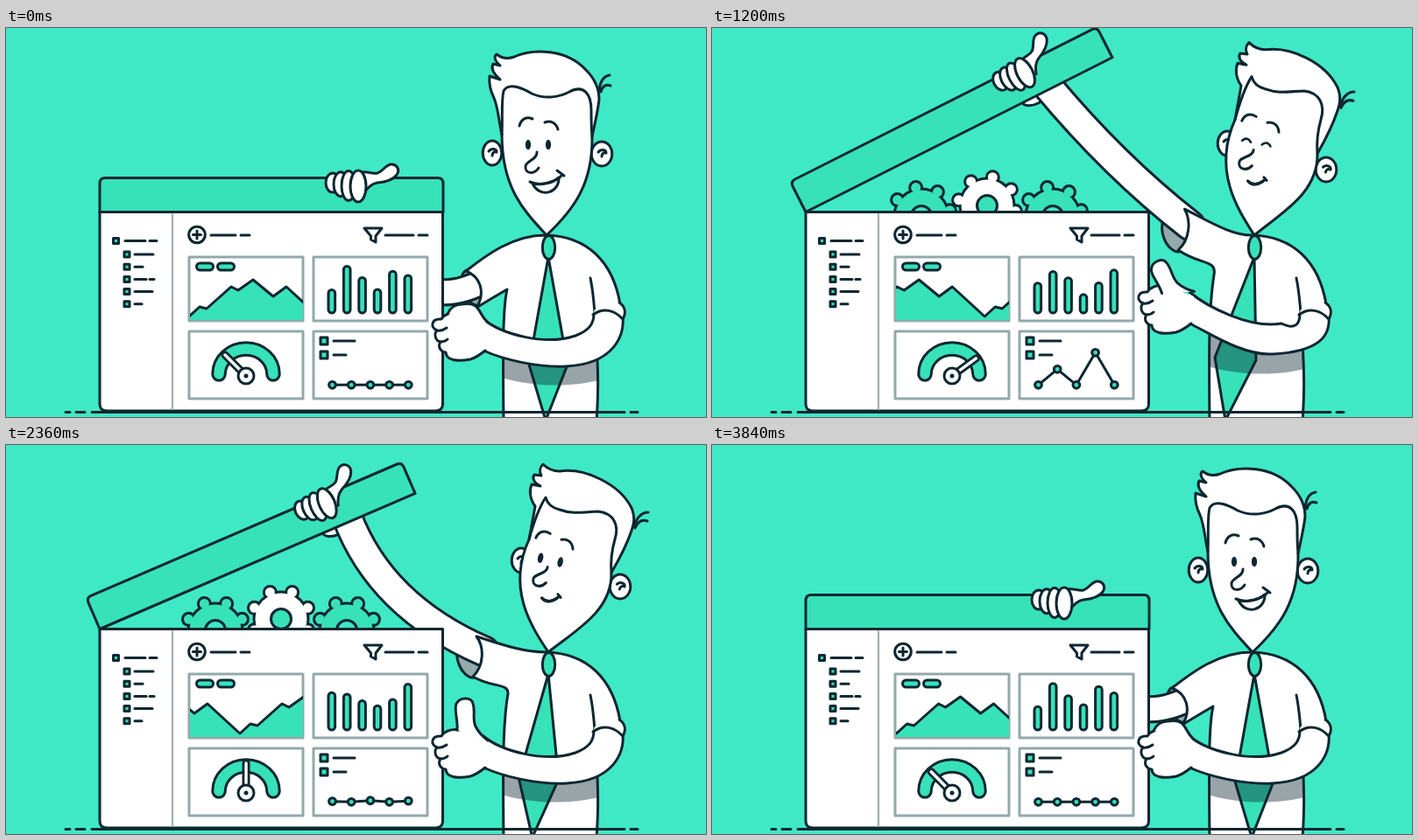
Recreate the animation shown at these times as an HTML page with a canvas. Size 799 px wide and 445 px high, loop 3880 ms.

```html
<!DOCTYPE html>
<html lang="en">
<head>
<meta charset="utf-8">
<title>Dashboard box</title>
<style>
html, body { margin: 0; width: 100%; height: 100%; overflow: hidden; background: #3fe9c6; }
canvas { display: block; width: 799px; height: 445px; }
</style>
</head>
<body>
<canvas id="stage"></canvas>
<script>
const W = 799, H = 445, LOOP = 3880, STEP = 40;
const BG = '#3fe9c6', GREEN = '#37e2b9', INK = '#0d2731', GREY = '#93a9ab', WHITE = '#fff';
const LINE = 3, HINGE = [107, 210.5];

const canvas = document.getElementById('stage');
const c = canvas.getContext('2d');
const dpr = window.devicePixelRatio || 1;
canvas.width = W * dpr;
canvas.height = H * dpr;

// ---------- motion ----------

const lerp = (a, b, t) => a + (b - a) * t;
const ease = (t, from, to) => {
  const u = Math.min(1, Math.max(0, (t - from) / (to - from)));
  return u * u * (3 - 2 * u);
};
// Up over a..b, held, down over d..e.
const hold = (t, a, b, d, e) => ease(t, a, b) - ease(t, d, e);
const bump = (t, mid, half) => Math.cos(Math.PI / 2 * Math.min(1, Math.abs(t - mid) / half)) ** 2;

// Tween between two path strings of the same structure.
function mix(a, b, t) {
  const to = b.match(/-?[\d.]+/g);
  let i = 0;
  return a.replace(/-?[\d.]+/g, v => lerp(+v, +to[i++], t).toFixed(2));
}

function poseAt(t) {
  const swing = bump(t, 1200, 280);
  const lid = 23.3 * hold(t, 720, 1200, 2850, 3220) + 3.5 * swing + 1.5 * bump(t, 3280, 70);
  return {
    t, lid, swing,
    open: Math.min(1, (lid / 23) ** .55),
    turn: hold(t, 770, 1160, 1300, 1560) + hold(t, 1740, 1980, 2980, 3260),
    eyes: 1 - hold(t, 900, 1000, 1260, 1340) - hold(t, 1760, 1840, 1960, 2040) - bump(t, 3120, 80),
    smile: 1 - hold(t, 900, 1120, 2480, 3240),
    tie: swing + .9 * bump(t, 2200, 350),
    thumb: hold(t, 960, 1140, 3000, 3200),
    gears: hold(t, 720, 1300, 2840, 3240),
    needle: 12 - 57 * Math.cos(2 * Math.PI * t / 1940),
    pulse: hold(t % 1940, 300, 1200, 1300, 1800)
  };
}

// ---------- drawing helpers ----------

function line(path, width = LINE, color = INK) {
  c.strokeStyle = color;
  c.lineWidth = width;
  c.stroke(new Path2D(path));
}
function draw(path, fill, outline = path) {
  c.fillStyle = fill;
  c.fill(new Path2D(path));
  if (outline) line(outline);
}
function finish(fill, width, color = INK) {
  c.fillStyle = fill;
  c.fill();
  c.strokeStyle = color;
  c.lineWidth = width;
  if (width) c.stroke();
}
function oval(x, y, rx, ry, fill, width = LINE, turn = 0) {
  c.beginPath();
  c.ellipse(x, y, rx, ry, turn, 0, 7);
  finish(fill, width);
}
function box(x, y, w, h, r, fill, width = LINE, color = INK) {
  c.beginPath();
  c.roundRect(x, y, w, h, r);
  finish(fill, width, color);
}
function turned(x, y, deg, paint) {
  c.save();
  c.translate(x, y);
  c.rotate(deg * Math.PI / 180);
  c.translate(-x, -y);
  paint();
  c.restore();
}

// ---------- box, lid and gears ----------

function gear(x, y, deg, fill, hole) {
  const blob = (grow, color) => {
    oval(x, y, 31 + grow, 31 + grow, color, 0);
    for (let i = 0; i < 8; i++) {
      const a = (deg + i * 45 - 90) * Math.PI / 180;
      oval(x + 33 * Math.cos(a), y + 33 * Math.sin(a), 7 + grow, 7 + grow, color, 0);
    }
  };
  blob(LINE / 2, INK);
  blob(-LINE / 2, fill);
  oval(x, y, 11.5, 11.5, hole);
}

function gears(p) {
  const low = 1 - p.gears, turn = 22.5 - 145 * low;
  for (const x of [239, 389]) gear(x, 212 + 38 * low, -turn, GREEN, BG);
  gear(314, 199 + 52 * low, turn, WHITE, GREEN);
}

function lid() {
  draw('M107 210.5V178Q107 171.5 113 171.5H493Q499 171.5 499 178V210.5Z', GREEN);
}

function hand(p) {
  for (let i = 0; i < 3; i++) oval(373 + 9 * i, 177 + 1.7 * i, 8, 11 + 3 * i, WHITE);
  turned(412, 176, -18 * p.open, () =>
    draw('M402 166C412 162 417 168 424 166C430 164 433 157 439 156C446 155 450 162 446 168' +
      'C443 172 436 176 424 177C418 178 414 181 409 188', WHITE));
  oval(402, 181, 9, 18, WHITE);
}

function backArm(p, lift) {
  const a = -p.lid * Math.PI / 180, reach = lerp(330, 307, p.open);
  const x = HINGE[0] + reach * Math.cos(a), y = HINGE[1] + reach * Math.sin(a) - 8;
  const bend = [lerp(450, 427, p.open) + 32 * p.swing, lerp(340, 184, p.open) - 26 * p.swing];
  const arm = `M${x} ${y}Q${bend} ${lerp(549, 546, lift)} ${lerp(288, 236, lift)}`;
  const width = lerp(29, 34, p.open);
  oval(lerp(533, 528, lift), lerp(297, 246, lift), 12, 21, GREY, LINE, -.35);
  turned(...HINGE, -p.lid, () => oval(400, 210, 16, 9, WHITE));
  line(arm, width + LINE);
  line(arm, width - LINE, WHITE);
}

// ---------- dashboard ----------

function areaChart(t) {
  const hill = [[0, 330], [12, 319], [20, 321], [48, 296], [56, 300], [73, 288], [96, 307], [111, 296]];
  const span = 148, start = 209 - span * t / LOOP;
  c.save();
  c.beginPath();
  c.rect(210, 263, 129, 71);
  c.clip();
  let top = '';
  for (let k = 0; k < 3; k++)
    for (const [x, y] of hill) top += `${top ? 'L' : 'M'}${start + k * span + x} ${y}`;
  draw(top + 'V345H0Z', GREEN, top);
  c.restore();
}

// Mean height, swing and phase in degrees of each bar.
const bars = [[292, 8.5, 0], [280, 6.5, 180], [291, 6, 222], [298, 8, 75], [284, 10, 118], [279.5, 5, 336]];

function barChart(t) {
  bars.forEach(([mean, amp, phase], i) => {
    const y = mean + amp * Math.cos(2 * Math.PI * (t / 970 - phase / 360));
    box(368 + i * 17.4, y - 1, 7.6, 327 - y, 3.8, GREEN);
  });
}

function gauge(deg) {
  const arc = 'M243 396A31 29 0 0 1 305 396', needle = 'M274 398V364';
  line(arc, 17.5);
  line(arc, 11.5, GREEN);
  turned(274, 398, deg, () => {
    line(needle, 9);
    line(needle, 3.4, WHITE);
  });
  oval(274, 398, 9, 9, WHITE);
  oval(274, 398, 2.5, 2.5, INK, 0);
}

function lineChart(p) {
  const peaks = p.t < LOOP / 2 ? [0, -18, 0, -37, 0] : [-13, 0, -32, 0, -24];
  const dots = peaks.map((h, i) => [372.5 + 21.7 * i, 408.3 + h * p.pulse]);
  line('M' + dots.join('L'));
  dots.forEach(([x, y]) => oval(x, y, 3.9, 3.9, GREEN));
}

function dashboard(p) {
  draw('M107 210.5H498.5V430Q498.5 438 490 438H115Q107 438 107 430Z', WHITE);
  line('M190 213V436', 2.2, '#9fb0b3');

  box(122.5, 240.5, 6, 6, 0, GREEN);
  line('M136 243.5H159M164 243.5H172');
  [21, 9, 13, 20, 8].forEach((w, i) => {
    const y = 259 + i * 14.2;
    box(135, y - 3, 6, 6, 0, GREEN);
    line(`M147 ${y}h${w}`);
  });
  line('M164 287.4H169');

  oval(218, 236.5, 9.3, 9.3, WHITE);
  line('M213.5 236.5H222.5M218 232V241M234 237H262M268 237H278M433 237H465M471 237H481');
  draw('M409 229H429L422 238V245L416.5 242V238Z', WHITE);

  for (const x of [209, 351])
    for (const [y, h] of [[262, 73], [347, 77]]) box(x, y, 130, h, 0, WHITE, LINE, GREY);
  areaChart(p.t);
  for (const x of [217.5, 241.5]) box(x, 269, 19, 8, 4, GREEN);
  barChart(p.t);
  gauge(p.needle);
  for (const [y, w] of [[358, 24], [374, 14]]) {
    box(359, y - 4, 8, 8, 0, GREEN);
    line(`M374 ${y}h${w}`);
  }
  lineChart(p);
}

// ---------- man ----------

function torso(p, lift) {
  const sleeve = mix(
    'M616 237C578 237 548 260 525 278C541 284 548 302 537 320C548 313 560 306 572 299',
    'M616 237C590 237 565 228 537 219C546 231 546 252 533 265C555 278 573 272 573 284', lift);
  const shape = sleeve + 'C567 320 567 370 568 450L674 450C676 420 677 400 672 326L701 316' +
    'C693 268 664 238 616 237Z';
  const q = p.tie;
  draw(shape, WHITE, null);
  draw(`M619 262L${597 - 23 * q} ${385 - 8 * q}L${616 - 30 * q} 449L${641 - 20 * q} ${385 - 5 * q}Z`, GREEN);
  c.save();
  c.clip(new Path2D(shape));
  c.translate(0, -13 * p.swing);
  draw('M550 360V394C590 412 650 413 690 399V360Z', 'rgba(13,39,49,.42)', null);
  c.restore();
  line(shape);
  line('M667 286C670 300 671 314 672 326');
  oval(619.5, 251, 7.2, 13.5, GREEN);
}

const headFront = 'M566 122C562 104 562 92 557 80C553 72 551 64 552 55L564 59C557 53 553 47 556 41L564 43' +
  'C557 37 557 32 560 30C565 34 572 36 580 33C602 23 640 24 662 48C674 60 677 72 677 82' +
  'C675 98 672 110 669 124C670 178 648 208 617 237C592 210 566 184 566 122Z';
const headSide = 'M597 108C600 92 602 82 604 70C598 62 597 52 600 45L610 47C603 44 600 38 603 34L611 35' +
  'C608 30 610 25 613 22C618 27 624 30 632 30C660 26 700 44 714 72C719 84 716 92 714 98' +
  'C708 116 698 134 691 146C692 190 650 212 619 237C600 208 571 165 597 108Z';
const hairFront = 'M566 122C567 104 565 84 568 72C574 61 592 70 600 75C616 82 632 79 643 73' +
  'C660 64 668 76 668 94C668 106 668 114 669 124';
const hairSide = 'M597 108C602 90 608 72 616 60C618 68 624 72 632 74C648 80 662 76 676 76' +
  'C694 78 700 92 695 108C691 122 690 134 691 146';

function ear(x, y, rx, deg) {
  oval(x, y, rx, 14, WHITE);
  turned(x, y, deg, () => line(`M${x - 4} ${y - 2}c3 -4 9 -3 9 1M${x} ${y + 3}c0 -3 2 -5 5 -4`));
}

function face(p) {
  line('M586 112C588 104 594 101 601 104M615 108C622 105 628 109 630 116');
  for (const x of [596, 619]) {
    if (p.eyes > .3) oval(x, 133.5, 3.1, 5.8 * p.eyes, INK, 0);
    else line(`M${x - 5} 134q5 -6 10 0`, 2.6);
  }
  draw('M606 142C607 150 594 152 593 158C592 167 603 168 608 160', WHITE);
  draw(mix('M607 178C612 182 620 180 626 172C620 181 612 183 607 178Z',
    'M601 178C611 180 624 177 631 171C632 188 610 196 601 178Z', p.smile), WHITE);
  line(mix('M607 178C612 182 620 180 626 172M624 170L628 173',
    'M598 176C610 181 626 178 635 168M629 163L637 169', p.smile));
}

function head(p) {
  const w = p.turn;
  ear(lerp(555, 588, w), lerp(143, 132, w), 10.8, 0);
  ear(lerp(680, 701, w), lerp(144, 162, w), 11.8, 12 * w);
  c.save();
  c.translate(0, 237);
  c.scale(1, 1 + .025 * p.swing);
  c.translate(0, -237);
  line(mix('M677 72C678 62 682 55 689 54M679 73C681 66 685 64 690 66',
    'M717 94C719 84 725 77 733 77M718 95C721 88 726 85 732 87', w));
  draw(mix(headFront, headSide, w), WHITE);
  line(mix(hairFront, hairSide, w));
  c.restore();
  c.save();
  c.translate(14 * w, -2 * w);
  turned(607, 133, 12 * w, () => face(p));
  c.restore();
}

function frontArm(p) {
  const up = 31 * p.swing, mid = 14 * p.swing;
  const under = `M704 330C706 352 694 ${384 - mid} 640 ${387 - mid}C605 ${389 - mid} 565 ${378 - up} 545 ${369 - up}`;
  const over = ` 545 ${333 - up}C565 ${350 - up} 615 ${364 - 1.4 * mid} 650 ${352 - mid}C666 346 671 338 671 327`;
  draw(under + 'L' + over + 'L688 314Z', WHITE, under + 'M' + over);
  const cuff = 'M670 328C682 319 695 323 704 333C708 326 707 319 700 314';
  draw(cuff + 'L672 322Z', WHITE, cuff);

  c.save();
  c.translate(0, -up);
  const fist = 'M517 326C508 324 500 328 497 333C485 332 484 343 492 346C488 350 490 358 496 359' +
    'C492 365 497 371 502 371C502 380 515 382 530 379C537 377 542 373 547 369';
  draw(fist + 'L550 338Z', WHITE, fist);
  line('M492 346C496 347 500 345 503 343M496 359C499 359 502 358 504 356');
  turned(536, 334, -22 * p.swing, () => draw(mix(
    'M504 327C507 320 512 316 520 316C526 315 532 315 536 318C540 322 541 324 543 328C545 332 547 334 550 337',
    'M515 326C516 314 511 302 514 296C518 288 532 288 533 296C536 305 532 314 536 322C540 330 546 335 550 338',
    p.thumb), WHITE));
  c.restore();
}

// ---------- scene ----------

function scene(t) {
  const p = poseAt(t), lift = p.open + .2 * p.swing;
  c.setTransform(dpr, 0, 0, dpr, 0, 0);
  c.lineCap = c.lineJoin = 'round';
  c.fillStyle = BG;
  c.fillRect(0, 0, W, H);
  backArm(p, lift);
  gears(p);
  turned(...HINGE, -p.lid, lid);
  dashboard(p);
  turned(...HINGE, -p.lid, () => hand(p));
  torso(p, lift);
  line('M68 439.5H73M80 439.5H90M98 439.5H706M713 439.5H721');
  head(p);
  frontArm(p);
}

const begin = performance.now();
function tick() {
  const t = (performance.now() - begin) % LOOP;
  scene(Math.floor(t / STEP) * STEP);
  requestAnimationFrame(tick);
}
tick();
</script>
</body>
</html>
```
